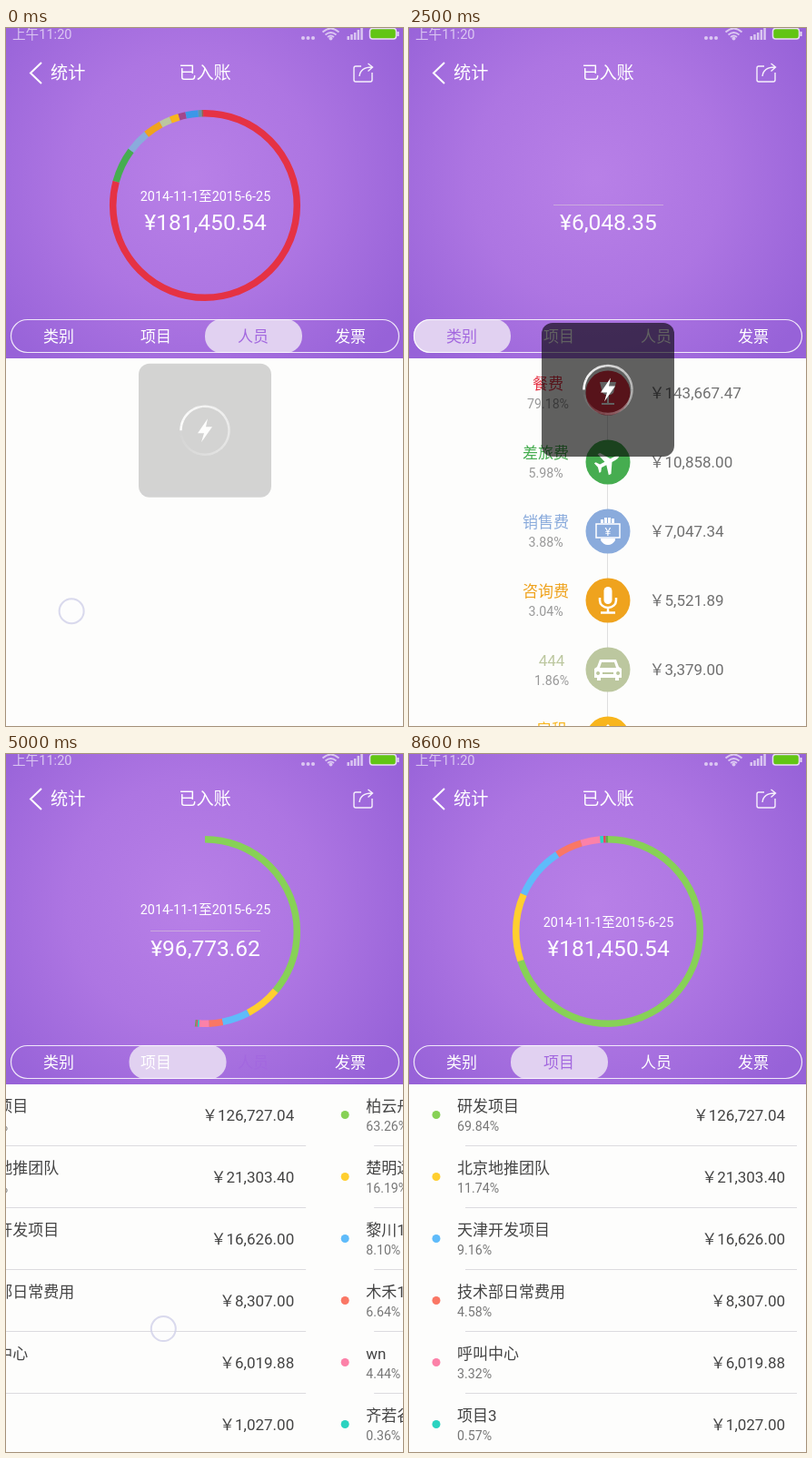
An HTML page for the animation above (9300 ms loop, 437 px wide and 767 px high).

```html
<!DOCTYPE html>
<html lang="zh-CN">
<head>
<meta charset="utf-8">
<title>统计</title>
<style>
html, body { margin: 0; width: 100%; height: 100%; overflow: hidden; background: #fdfdfc; }
svg { display: block; width: 100%; height: 100%; font-family: Roboto, "Noto Sans CJK SC", "Noto Sans CJK", sans-serif; }
.white { fill: #fff; }
.line { fill: none; stroke: #fff; }
.mid { text-anchor: middle; }
.end { text-anchor: end; }
</style>
</head>
<body>
<svg id="stage" viewBox="0 0 437 767">
  <defs>
    <radialGradient id="purple" gradientUnits="userSpaceOnUse" cx="205" cy="165" r="275">
      <stop offset="0" stop-color="#b880e7"/>
      <stop offset=".5" stop-color="#ad75e2"/>
      <stop offset="1" stop-color="#9762d8"/>
    </radialGradient>
    <clipPath id="aboveLine"><rect x="100" y="100" width="240" height="94"/></clipPath>
    <clipPath id="below"><rect y="363" width="437" height="404"/></clipPath>
  </defs>
  <rect width="437" height="767" fill="#fdfdfc"/>
  <g clip-path="url(#below)" id="lists"></g>
  <rect width="437" height="363" fill="url(#purple)"/>

  <g opacity=".62">
    <text x="7" y="11.5" font-size="14.6" class="white">上午11:20</text>
    <g class="white">
      <circle cx="327" cy="11" r="2"/><circle cx="332.5" cy="11" r="2"/><circle cx="338" cy="11" r="2"/>
      <path d="M375.500 9h2.500v4h-2.500zM379.200 7h2.500v6h-2.500zM382.900 5h2.500v8h-2.500zM386.600 2h2.500v11h-2.500zM390.300 0h2.500v13h-2.500z"/>
      <circle cx="357.500" cy="11.500" r="2"/>
    </g>
    <path class="line" stroke-width="1.800" d="M348.500 4.500q9-8 18 0M351.500 7.500q6-5 12 0M354 10q3.500-3 7 0"/>
  </g>
  <rect x="400.500" y=".500" width="29" height="11.500" rx="3" fill="#62c514" stroke="#eadcf7" stroke-width="1.500"/>
  <rect x="430.500" y="4" width="2" height="5" fill="#eadcf7"/>

  <path class="line" stroke-width="2" d="M39 38L27 49.500L39 61"/>
  <text x="49" y="56" font-size="19.200" class="white">统计</text>
  <text x="219" y="56" font-size="19.200" class="white mid">已入账</text>
  <path class="line" stroke-width="1.400" opacity=".9" d="M391 42H385q-2 0-2 2V57q0 2 2 2H401q2 0 2-2V49M389 53q1-10 14-10M398.500 39L403.500 43L398.500 47.500"/>

  <g id="ring" fill="none" stroke-width="7.500" transform="rotate(-90 219 195)"></g>
  <path id="rule" d="M159 194.500H280" stroke="#d9c9d8" stroke-opacity=".6"/>
  <g id="dateClip"><text id="date" x="219.500" font-size="14.400" class="white mid">2014-11-1至2015-6-25</text></g>
  <text id="total" x="219.500" y="222" font-size="24.500" class="white mid"></text>

  <rect id="pill" y="320" width="107" height="37" rx="18" fill="#e1d1f1"/>
  <rect x="5.500" y="320.500" width="427" height="36" rx="18" class="line" stroke-opacity=".85" stroke-width="1.200"/>
  <g id="tabs" font-size="17" class="mid"></g>

  <circle id="touch" r="13.500" fill="#fff" fill-opacity=".25" stroke="#cfcfe8" stroke-opacity=".8" stroke-width="2"/>
  <g id="loader">
    <rect x="-73" y="-73.500" width="146" height="147" rx="12" fill="#000" fill-opacity=".62"/>
    <g id="spinner" fill="none" stroke="#fff" stroke-width="2.500"></g>
    <path class="white" d="M3-13L-8 3H-1L-4 13L8-4H1Z"/>
  </g>
</svg>
<script>
const LOOP = 9300, STEP = 100, COUNT_MS = 1340, TOTAL = 181450.54, PAGE_W = 440;
const GREEN = '#87d156', YELLOW = '#ffcf2f', BLUE = '#5fbbfa', CORAL = '#fa7765', PINK = '#fc81a8', TEAL = '#2bd3c0';
const PALETTE = [GREEN, YELLOW, BLUE, CORAL, PINK, TEAL];

const $ = id => document.getElementById(id);
const clamp = v => Math.max(0, Math.min(1, v));
const money = v => v.toLocaleString('en-US', { minimumFractionDigits: 2, maximumFractionDigits: 2 });

function el(tag, attrs, parent, text) {
  const node = document.createElementNS('http://www.w3.org/2000/svg', tag);
  for (const k in attrs) node.setAttribute(k, attrs[k]);
  if (text) node.textContent = text;
  parent.appendChild(node);
  return node;
}

const people = [
  ['柏云舟', 63.26, 114788.11], ['楚明远', 16.19, 29381], ['黎川12', 8.1, 14692],
  ['木禾111', 6.64, 12046.43], ['wn', 4.44, 8051], ['齐若谷', 0.36, 654]
];
const projects = [
  ['研发项目', 69.84, 126727.04], ['北京地推团队', 11.74, 21303.4], ['天津开发项目', 9.16, 16626],
  ['技术部日常费用', 4.58, 8307], ['呼叫中心', 3.32, 6019.88], ['项目3', 0.57, 1027]
];
const invoices = [['有发票', 93.1, 168930.45], ['无发票', 6.9, 12520.09]];

// name, share, amount, colour, label centre, icon
const categories = [
  ['餐费', 79.18, 143667.47, '#e53244', 153,
    '<path d="M-9-12H9L6 0Q0 5-6 0ZM-1 2H1V11H7V13H-7V11H-1Z"/>'],
  ['差旅费', 5.98, 10858, '#46ad50', 150.5,
    '<path transform="rotate(62)" d="M0-14Q2-12 2-8V-4L13 3V6L2 3V9L6 12V14L0 12.500L-6 14V12L-2 9V3L-13 6V3L-2-4V-8Q-2-12 0-14Z"/>'],
  ['销售费', 3.88, 7047.34, '#8aabdc', 150.5,
    '<path d="M-8-9V-13h3v4zM-4-9V-15h3v6zM0-9V-15h3v6zM4-9V-14h3v5zM-8 8H8V10Q5 15 0 15T-8 10Z"/>' +
    '<path d="M-13-8H13V7H-13Z" fill="none" stroke="#fff" stroke-width="1.500"/><text class="mid" y="5" font-size="13">¥</text>'],
  ['咨询费', 3.04, 5521.89, '#efa31e', 150.5,
    '<rect x="-4.500" y="-15" width="9" height="19" rx="4.500"/>' +
    '<path d="M-9-3V0a9 8 0 0 0 18 0V-3M0 8V13M-8 13.500H8" fill="none" stroke="#fff" stroke-width="2.500"/>'],
  ['444', 1.86, 3379, '#bcc79f', 157,
    '<path fill-rule="evenodd" d="M-9-11H9L12-3L15-1V9H12V12H8V9H-8V12H-12V9H-15V-1L-12-3ZM-7-8L-9-2H9L7-8ZM-11 2a2 2 0 1 0 .1 0zM11 2a2 2 0 1 0 .1 0zM-6 3V5H6V3Z"/>'],
  ['房租', 1.5, 2721.76, '#f8b51c', 157, '<path d="M0-16L14-2H9V12H-9V-2H-14Z"/>']
];

const slices = rows => rows.map((r, i) => [r[1], r[3] || PALETTE[i]]);
const charts = {
  category: slices(categories).concat([[1.25, '#a3468c'], [2.15, '#3c97e8'], [.6, '#5f96a8'], [.25, '#8d6a48'], [.31, '#e53244']]),
  project: slices(projects).concat([[.4, '#f0405c'], [.39, '#68a94e']]),
  people: slices(people).concat([[.5, '#e88a8a'], [.51, '#8fb37a']]),
  invoice: slices(invoices)
};

function listPage(rows) {
  const page = el('g', {}, $('lists'));
  rows.forEach(([name, share, amount], i) => {
    const row = el('g', { transform: `translate(0 ${363 + 68 * i})` }, page);
    el('circle', { cx: 30, cy: 33.5, r: 4.5, fill: PALETTE[i] }, row);
    el('text', { x: 53, y: 30, 'font-size': 17, fill: '#444' }, row, name);
    el('text', { x: 53, y: 51, 'font-size': 14.2, fill: '#777' }, row, share.toFixed(2) + '%');
    el('text', { x: 414, y: 40, 'font-size': 17, fill: '#444', class: 'end' }, row, '￥' + money(amount));
    el('path', { d: 'M62 67.5H427', stroke: '#dcdbdf' }, row);
  });
  return page;
}

function categoryPage() {
  const page = el('g', {}, $('lists'));
  el('path', { d: 'M218.5 401V767', stroke: '#dedede' }, page);
  categories.forEach(([name, share, amount, color, cx, icon], i) => {
    const row = el('g', { transform: `translate(0 ${401 + 76 * i})` }, page);
    el('circle', { cx: 219, cy: 0, r: 24.5, fill: color }, row);
    el('g', { transform: 'translate(219 0)', class: 'white' }, row).innerHTML = icon;
    el('text', { x: cx, y: -4, 'font-size': 17, fill: color, class: 'mid' }, row, name);
    el('text', { x: cx, y: 17, 'font-size': 14.2, fill: '#999', class: 'mid' }, row, share.toFixed(2) + '%');
    el('text', { x: 264.5, y: 6, 'font-size': 17, fill: '#707070' }, row, '￥' + money(amount));
  });
  return page;
}

// each page with the time its data arrives
const pages = [[categoryPage(), 2450], [listPage(projects), 3000], [listPage(people), 500], [listPage(invoices), 5845]];
const tabs = ['类别', '项目', '人员', '发票'].map((s, i) => el('text', { x: 58 + 107 * i, y: 345 }, $('tabs'), s));
const arcs = charts.category.map(() => el('circle', { cx: 219, cy: 195, r: 101.3, pathLength: 360 }, $('ring')));
for (let i = 0; i < 30; i++) {
  el('circle', { r: 26.5, pathLength: 360, 'stroke-dasharray': '12.5 347.5',
    transform: `rotate(${180 + i * 12})`, 'stroke-opacity': 1 - i / 30 }, $('spinner'));
}

const counts = [[-2000, 'category'], [500, 'people'], [2450, 'category'], [4280, 'project'], [5845, 'invoice'], [7260, 'project']];
const selected = [[0, 2], [1500, 1], [2000, 0], [3700, 1], [5000, 2], [5600, 3], [6350, 2], [6750, 1]];
const scroll = [[0, 2], [1300, 2], [1500, 1.7], [1700, 1.1], [1800, 1], [1900, 1], [2100, .4], [2300, 0],
  [3500, 0], [3700, .3], [3900, .83], [4000, .95], [4100, 1], [4800, 1], [5000, 1.22], [5200, 1.88], [5300, 2],
  [5450, 2], [5700, 2.85], [5800, 3], [6200, 3], [6400, 2.2], [6500, 2], [6600, 2], [6800, 1.15], [6900, 1]];
// start, end, from x, y, to x, y
const swipes = [[-300, 50, 271, 585, 39, 650], [1200, 1600, 150, 624, 328, 610], [1850, 2150, 160, 600, 300, 585],
  [3450, 3800, 271, 585, 90, 630], [4700, 5050, 271, 599, 157, 637], [5400, 5700, 280, 600, 90, 635],
  [6150, 6400, 120, 630, 310, 605], [6550, 6800, 120, 630, 310, 605]];
// shown, leaving
const loads = [[-400, -220], [2100, 2500], [4100, 4250], [5750, 5850], [6750, 6825]];

const latest = (list, t) => list.filter(k => k[0] <= t).pop();

function between(keys, t) {
  const next = keys.findIndex(k => k[0] > t);
  if (next < 0) return keys[keys.length - 1][1];
  const [t0, a] = keys[next - 1], [t1, b] = keys[next];
  return a + (b - a) * (t - t0) / (t1 - t0);
}

function drawChart(t) {
  const [start, name] = latest(counts, t);
  const c = clamp(Math.floor((t - start) / COUNT_MS * 30) / 30);
  const sweep = clamp(1.176 * c - .11) * 3.6;
  let from = 0;
  arcs.forEach((arc, i) => {
    const [share, color] = charts[name][i] || [0, 'none'];
    arc.setAttribute('stroke', sweep && share ? color : 'none');
    arc.setAttribute('stroke-dasharray', `${share * sweep} 400`);
    arc.setAttribute('stroke-dashoffset', -from);
    from += share * sweep;
  });
  const rise = 1 - (1 - clamp((c - .05) / .45)) ** 2;
  const settle = clamp((c - .6) / .25);
  $('date').setAttribute('y', 210 - 34 * rise + 14 * settle);
  $('dateClip').setAttribute('clip-path', 'url(#aboveLine)');
  $('rule').setAttribute('opacity', 1 - settle);
  $('total').textContent = '¥' + money(TOTAL * c);
}

function drawPages(t) {
  const pos = between(scroll, t), tab = latest(selected, t)[1];
  pages.forEach(([page, ready], i) => {
    page.setAttribute('transform', `translate(${(i - pos) * PAGE_W} 0)`);
    page.setAttribute('display', t >= ready && Math.abs(i - pos) < 1 ? 'inline' : 'none');
  });
  $('pill').setAttribute('x', 5 + 107 * pos);
  tabs.forEach((node, i) => node.setAttribute('fill', i === tab ? '#a368df' : '#fff'));
}

function drawTouch(t) {
  const s = swipes.find(k => t >= k[0] && t <= k[1]);
  $('touch').setAttribute('display', s ? 'inline' : 'none');
  if (!s) return;
  const p = (t - s[0]) / (s[1] - s[0]);
  $('touch').setAttribute('cx', s[2] + (s[4] - s[2]) * p);
  $('touch').setAttribute('cy', s[3] + (s[5] - s[3]) * p);
}

function drawLoader(t) {
  const [, leave] = latest(loads, t);
  const out = clamp((t - leave) / 300);
  $('loader').setAttribute('opacity', 1 - out);
  $('loader').setAttribute('transform', `translate(219 ${397.5 + 61 * out})`);
  $('spinner').setAttribute('transform', `rotate(${Math.min(0, t - leave) * .4})`);
}

function frame(now) {
  const t = Math.floor(now % LOOP / STEP) * STEP;
  const shown = Math.min(t, 8600);
  drawChart(shown);
  drawPages(shown);
  drawTouch(shown);
  drawLoader(shown);
  requestAnimationFrame(frame);
}
frame(performance.now());
</script>
</body>
</html>
```
